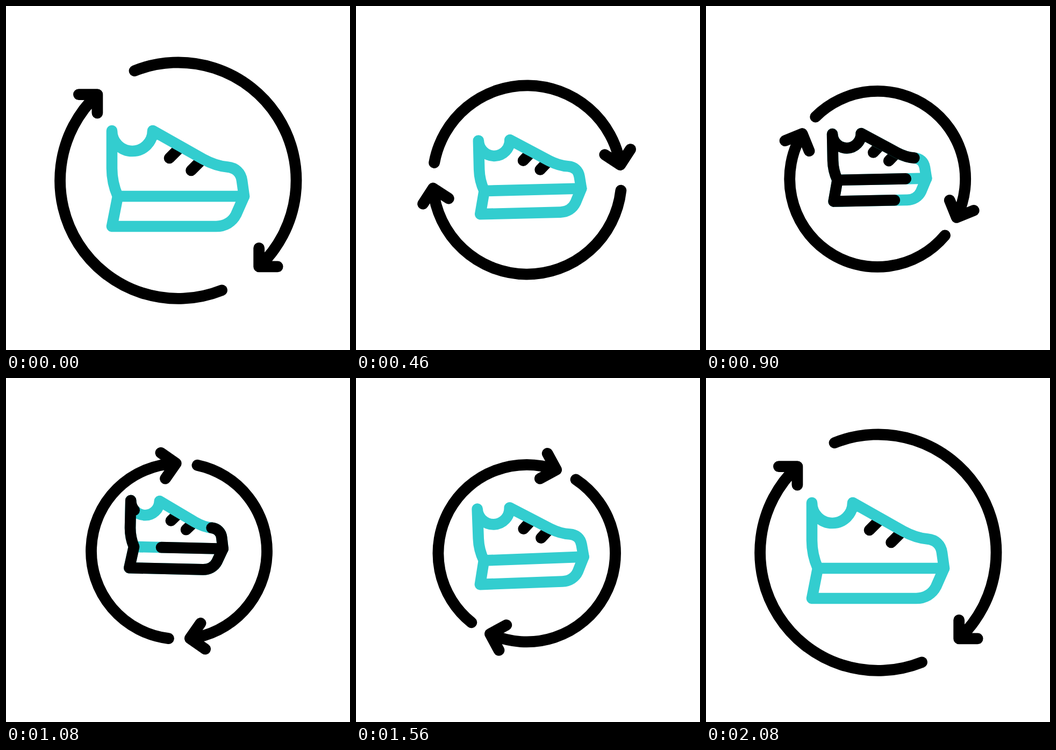
An HTML page for the animation above (2.98 s loop, 640 px wide and 640 px high).

```html
<!DOCTYPE html>
<html lang="en">
<head>
<meta charset="utf-8">
<title>Shoe exchange</title>
<style>
  html, body { margin: 0; width: 100%; height: 100%; overflow: hidden; background: #fff; }
  svg { display: block; width: 100%; height: 100%; }
  path { fill: none; stroke: #000; stroke-linecap: round; stroke-linejoin: round; }
  .teal { stroke: #33cdcf; }
</style>
</head>
<body>
<svg viewBox="0 0 640 640">
  <g id="ring" stroke-width="20.8"><path id="arcA"/><path id="arcB"/></g>
  <g id="shoe">
    <path d="M304 283L323 264M344.500 306L364 286.500"/>
    <path class="teal" data-part="sole"/>
    <path class="teal" data-part="outline"/>
    <path class="wave" data-part="sole" pathLength="1"/>
    <path class="wave" data-part="outline" pathLength="1"/>
  </g>
</svg>
<script>
const LOOP = 2980, START = 220, END = 2080;
const FULL = 219.7, SMALL = 163.5;
const $ = id => document.getElementById(id);

const parts = {
  sole: 'M208 354H443',
  outline: 'M412 299.500C394 298 380 292 367 285L273 232A38 38 0 0 1 197 232V302' +
    'C197 320 201 338 208 354L197 410H391C407 410 421 402 428 388L443 354' +
    'L439 325C437 310 427 301 412 299.500Z'
};
document.querySelectorAll('[data-part]').forEach(p => p.setAttribute('d', parts[p.dataset.part]));
const waves = document.querySelectorAll('.wave');

// Shoe sway: time, centre x, centre y, rotation
const sway = [
  [220, 320, 321, 0], [300, 320.5, 321, 0.2], [720, 328, 308, -3.3], [1080, 317.5, 292.5, 1.3],
  [1320, 321.5, 300.7, -0.2], [1760, 327, 317, -3], [2080, 320, 321, 0]
];

const progress = (t, a, b) => Math.min(1, Math.max(0, (t - a) / (b - a)));
const easeOut = (t, a, b) => Math.sin(progress(t, a, b) * Math.PI / 2);
const easeInOut = (t, a, b) => (1 - Math.cos(progress(t, a, b) * Math.PI)) / 2;

// Smooth curve through the sway keys, at rest on both ends
function swayAt(t, c) {
  t = Math.min(END, Math.max(START, t));
  let i = 0;
  while (i < sway.length - 2 && t > sway[i + 1][0]) i++;
  const slope = j => {
    const p = sway[j - 1], n = sway[j + 1];
    return p && n ? (n[c] - p[c]) / (n[0] - p[0]) : 0;
  };
  const a = sway[i], b = sway[i + 1], d = b[0] - a[0], u = (t - a[0]) / d, v = 1 - u;
  return v * v * ((1 + 2 * u) * a[c] + u * d * slope(i)) +
         u * u * ((1 + 2 * v) * b[c] - v * d * slope(i + 1));
}

// Arc with an arrowhead whose arms keep their length
function arrow(r, turn, widen) {
  const rad = Math.PI / 180;
  const at = deg => [r * Math.cos(deg * rad), r * Math.sin(deg * rad)];
  const tail = at(turn - 111.7 - widen), tip = at(turn + 46.8 + widen);
  const side = turn ? -34.5 : 34.5, [x, y] = tip;
  return `M${tail}A${r} ${r} 0 0 1 ${tip}M${x} ${y - side}V${y}H${x + side}`;
}

function drawRing(t) {
  const shrink = easeOut(t, START, 640) - easeInOut(t, 1505, END);
  const r = FULL + (SMALL - FULL) * shrink;
  const windUp = t > START ? -57 * (1 - Math.exp((START - t) / 38)) : 0;
  const angle = windUp + 417 * easeInOut(t, 630, END);
  $('ring').setAttribute('transform',
    `translate(320.3 324.7) rotate(${angle}) translate(0 ${-3 * shrink})`);
  $('arcA').setAttribute('d', arrow(r, 0, 1.2 * shrink));
  $('arcB').setAttribute('d', arrow(r, 180, 6.3 * shrink));
}

function drawShoe(t) {
  const scale = 1 - 0.295 * (easeOut(t, START, 640) - easeInOut(t, 1380, 1880));
  const [x, y, turn] = [1, 2, 3].map(c => swayAt(t, c));
  $('shoe').setAttribute('transform',
    `translate(${x} ${y}) rotate(${turn}) scale(${scale}) translate(-320 -321)`);
  $('shoe').setAttribute('stroke-width', 20.6 / scale);

  const from = easeInOut(t, 895, 1392), to = easeInOut(t, 563, 1060);
  for (const w of waves) {
    w.style.visibility = to - from > 0.001 ? 'visible' : 'hidden';
    w.setAttribute('stroke-dasharray', `${to - from} 2`);
    w.setAttribute('stroke-dashoffset', -from);
  }
}

const begin = performance.now();
function frame() {
  const t = (performance.now() - begin) % LOOP;
  drawRing(t);
  drawShoe(t);
  requestAnimationFrame(frame);
}
frame();
</script>
</body>
</html>
```
